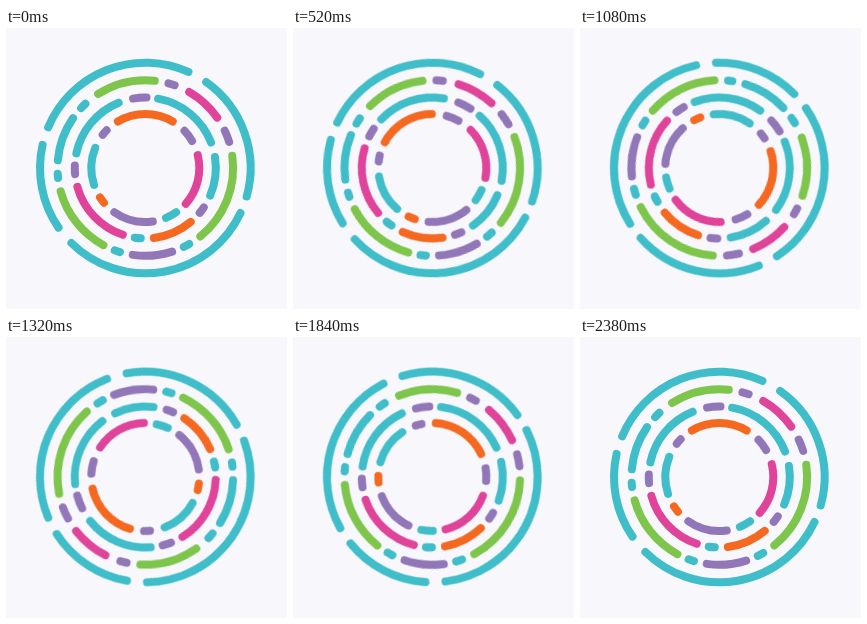
Recreate the animation shown at these times as an HTML page. Size 281 by 281 pixels, loop 2.4 s.

```html
<!DOCTYPE html>
<html lang="en">
<head>
<meta charset="utf-8">
<title>Spinning rings</title>
<style>
  html, body { margin: 0; width: 100%; height: 100%; overflow: hidden; background: #f7f7fc; }
  svg { display: block; width: 100vw; height: 100vh; }
  path { fill: none; stroke-width: 8; stroke-linecap: round; }
  g { transform-origin: 139.3px 140px; animation: 2400ms infinite; }

  /* Each ring makes two full turns inside its own part of the loop. */
  #outer  { animation-name: outer;  --ease: cubic-bezier(.67, 0, .32, 1); }
  #second { animation-name: second; --ease: cubic-bezier(.71, 0, .27, 1); }
  #third  { animation-name: third;  --ease: cubic-bezier(.71, 0, .27, 1); }
  #inner  { animation-name: inner;  --ease: cubic-bezier(.71, 0, .27, 1); }
  g { animation-timing-function: var(--ease); }

  @keyframes outer {
    0%, 16% { transform: rotate(0deg); }
    98.1%, 100% { transform: rotate(720deg); }
  }
  @keyframes second {
    0%, 10.4% { transform: rotate(0deg); }
    87.3%, 100% { transform: rotate(-720deg); }
  }
  @keyframes third {
    0%, 4.45% { transform: rotate(0deg); }
    83.2%, 100% { transform: rotate(720deg); }
  }
  @keyframes inner {
    0% { transform: rotate(0deg); }
    100% { transform: rotate(-720deg); }
  }
</style>
</head>
<body>
<svg viewBox="0 0 281 281">
  <g id="outer"></g>
  <g id="second"></g>
  <g id="third"></g>
  <g id="inner"></g>
</svg>
<script>
  const CX = 139.3, CY = 140;
  const teal = '#3fbdc9', green = '#7dc54b', pink = '#e0439a',
        purple = '#9277b8', orange = '#f5681f';

  // Arcs are [colour, start, end] in degrees clockwise from the top.
  const rings = {
    outer: { r: 105.3, arcs: [
      [teal, -67.3, 24.2], [teal, 35.3, 105.7], [teal, 115.3, 224.6], [teal, 235.5, 282.7]
    ] },
    second: { r: 87.8, arcs: [
      [green, -32.5, 6.2], [purple, 15.3, 19.5], [pink, 30, 55], [purple, 64.8, 72.7],
      [green, 82, 141.2], [teal, 150, 154], [purple, 162.2, 188.2], [teal, 196.8, 200.4],
      [green, 208.5, 254.6], [teal, 263.5, 266.3], [teal, 275, 304.6], [teal, 313, 317]
    ] },
    third: { r: 70.5, arcs: [
      [purple, -10, 1], [teal, 10.5, 68.8], [teal, 81, 113], [purple, 124, 129.5],
      [orange, 139.9, 173], [teal, 183.7, 188.6], [pink, 198.6, 254.4],
      [purple, 265, 272], [teal, 282, 337.8]
    ] },
    inner: { r: 54, arcs: [
      [orange, -30.5, 30.5], [purple, 46.5, 60], [pink, 76.2, 131.5], [teal, 145.2, 157.5],
      [purple, 172, 215], [orange, 230, 237], [teal, 251.7, 292], [purple, 308, 314.3]
    ] }
  };

  const point = (r, deg) => {
    const a = deg * Math.PI / 180;
    return (CX + r * Math.sin(a)).toFixed(2) + ' ' + (CY - r * Math.cos(a)).toFixed(2);
  };

  for (const [id, { r, arcs }] of Object.entries(rings)) {
    document.getElementById(id).innerHTML = arcs.map(([color, from, to]) =>
      `<path stroke="${color}" d="M${point(r, from)}A${r} ${r} 0 0 1 ${point(r, to)}"/>`
    ).join('');
  }
</script>
</body>
</html>
```
